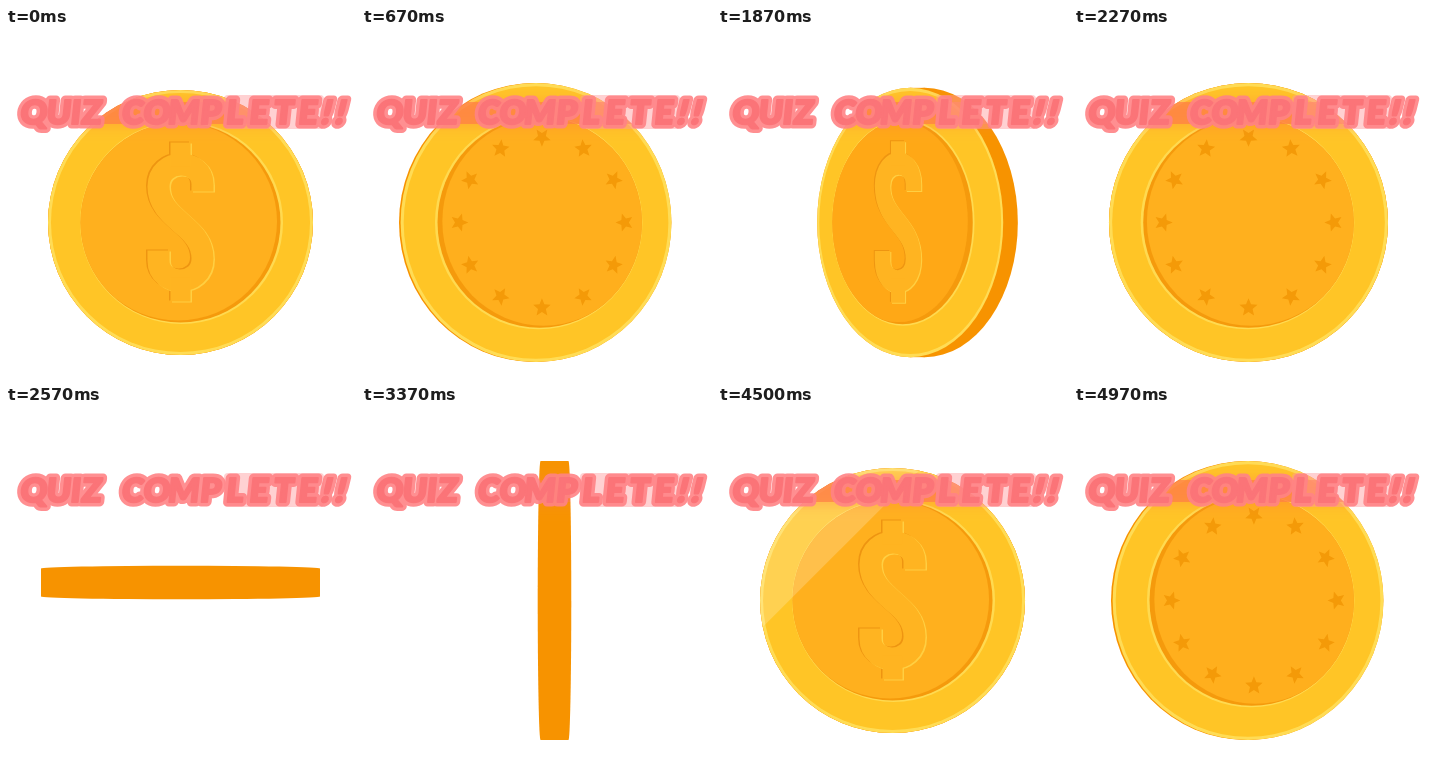
An HTML page with a canvas for the animation above (5.07 s loop, 350x350 px).

```html
<!DOCTYPE html>
<html lang="en">
<head>
<meta charset="utf-8">
<title>Quiz complete</title>
<style>
  html, body { margin: 0; width: 100%; height: 100%; overflow: hidden; background: #fff; }
  canvas, svg { position: absolute; left: 0; top: 0; width: 350px; height: 350px; }
  text { font: 900 33px Lato, sans-serif; text-anchor: middle; stroke-linejoin: round; }
  .halo { fill: #ff8386; stroke: #ff8386; stroke-width: 9px; opacity: .9; }
  .ink { fill: #fb7478; stroke: #fb7478; stroke-width: 2px; }
</style>
</head>
<body>
<canvas id="stage" width="350" height="350"></canvas>
<svg viewBox="0 0 350 350">
  <defs>
    <g id="title" transform="translate(9 0) skewX(-6)">
      <text y="96.5" x="28 53 70 86">QUIZ</text>
      <text y="96.5" x="127 151 178 205 229 253 278 302">COMPLETE</text>
      <text y="96.5" x="333 347" transform="skewX(-8)">!!</text>
    </g>
  </defs>
  <rect x="218" y="67" width="100" height="34" rx="4" fill="#ff9a9c" opacity=".45"/>
  <use href="#title" class="halo"/>
  <use href="#title" class="ink"/>
</svg>
<script>
const ctx = document.getElementById('stage').getContext('2d');
const LOOP = 5070, PERIOD = 2900, HOLD = 170, STEP = 79.7;
const CX = 174.5, CY = 194.5, R = 132.5, TAU = Math.PI * 2;

const dollar = new Path2D('M22-31V-38C22-65-22-65-22-36C-22-2 22 2 22 36C22 65-22 65-22 38V28');
const bars = new Path2D('M-10-80h20v24h-20zM-10 55h20v24h-20z');

function disc(x, y, rx, ry, color) {
  ctx.beginPath();
  ctx.ellipse(x, y, rx, ry, 0, 0, TAU);
  ctx.fillStyle = color;
  ctx.fill();
}

function drawDollar(dx, dy, color) {
  ctx.save();
  ctx.translate(dx, dy);
  ctx.fillStyle = ctx.strokeStyle = color;
  ctx.lineWidth = 22;
  ctx.stroke(dollar);
  ctx.fill(bars);
  ctx.restore();
}

function drawStar(x, y, r, turn) {
  ctx.beginPath();
  for (let i = 0; i < 10; i++) {
    const a = turn + i * TAU / 10, d = i % 2 ? r * .45 : r;
    ctx.lineTo(x + d * Math.cos(a), y + d * Math.sin(a));
  }
  ctx.fillStyle = '#f49a08';
  ctx.fill();
}

// (px, py): parallax of the recessed floor
function drawFace(front, shade, shine, px, py) {
  disc(0, 0, R, R, '#ffdc55');
  disc(0, 0, R - 3, R - 3, '#ffc526');

  ctx.save();
  ctx.translate(15 * px, 15 * py);
  disc(1, 0, 101.5, 101.5, '#ffda50');
  disc(0, 0, 100, 100, '#f59a0c');
  ctx.clip();
  ctx.translate(5 * px, 5 * py);
  disc(-2.5, -1, 99, 99, '#ffb01e');
  if (shade > .01) {
    ctx.globalAlpha = shade;
    disc(-2.5, -1, 99, 99, '#ff9200');
    ctx.globalAlpha = 1;
  }
  ctx.translate(4 * px, 4 * py);
  if (front) {
    drawDollar(-1.5, -1, '#ee9511');
    drawDollar(1.5, 1, '#ffcf42');
    drawDollar(0, 0, '#ffb421');
  } else {
    for (let i = 0; i < 12; i++) {
      const a = i * TAU / 12;
      drawStar(81 * Math.cos(a), 81 * Math.sin(a), 9, a + Math.PI);
    }
  }
  ctx.restore();

  if (front && shine > -R && shine - 107 < R) {
    ctx.save();
    ctx.beginPath();
    ctx.arc(0, 0, R, 0, TAU);
    ctx.clip();
    ctx.rotate(-Math.PI * .75);
    ctx.fillStyle = 'rgba(255,255,255,.2)';
    ctx.fillRect(shine - 107, -150, 107, 300);
    ctx.restore();
  }
}

// a: flip angle, 0 = front, PI = back; vertical: flips over the horizontal axis
function drawCoin(a, vertical, shine) {
  const sin = Math.sin(a), cos = Math.cos(a), front = cos >= 0;
  const size = 1 + 14 / 265 * Math.min(1, 1 - cos);
  const r = R * size, squash = Math.max(Math.abs(cos), .02);
  const sin2 = Math.sin(2 * a);
  const shift = vertical
    ? -18 * sin * sin + (front ? 32 : 14) * sin2 * Math.abs(sin2)
    : 18 * sin + 12 * sin2;
  const half = 14 * sin * sin;
  const near = front ? -half : half, mirror = front ? 1 : -1;
  const ux = vertical ? 0 : 1, uy = 1 - ux;
  const rx = ux ? r * squash : r, ry = uy ? r * squash : r;

  ctx.save();
  ctx.translate(CX + ux * shift, CY + uy * shift);
  const side = '#f79300';
  disc(ux * half, uy * half, rx, ry, side);
  disc(-ux * half, -uy * half, rx, ry, side);
  if (vertical) ctx.fillRect(-r, -half, 2 * r, 2 * half);
  else ctx.fillRect(-half, -r, 2 * half, 2 * r);

  if (Math.abs(cos) > .05) {
    ctx.translate(ux * near, uy * near);
    ctx.scale(rx / R * (ux ? mirror : 1), ry / R * (uy ? mirror : 1));
    drawFace(front, ux * .5 * sin * sin, shine, -ux * sin, -uy * sin);
  }
  ctx.restore();
}

// Soft glow of the title, only where it falls on the coin
function drawGlow() {
  ctx.save();
  ctx.globalCompositeOperation = 'source-atop';
  ctx.shadowColor = ctx.fillStyle = 'rgba(255,125,70,.7)';
  ctx.shadowBlur = 16;
  ctx.fillRect(20, 74, 310, 22);
  ctx.restore();
}

const flip = x => Math.PI / (1 + Math.exp(-x * (1 + .06 * x * x)));

// Pictures advance in even ticks; the first one lasts two.
function tickAt(t) {
  t %= PERIOD;
  return t < HOLD ? 0 : Math.min(35, Math.floor((t - HOLD) / STEP + 2.4));
}

function frame(now) {
  const tick = tickAt(now % LOOP), c = tick % 18;
  const vertical = c > 10;
  ctx.clearRect(0, 0, 350, 350);
  drawCoin(vertical ? flip(14 - c) : flip(c - 6), vertical, 53 * (tick - 15) - 85);
  drawGlow();
  requestAnimationFrame(() => frame(performance.now() - start));
}

const start = performance.now();
frame(0);
</script>
</body>
</html>
```
